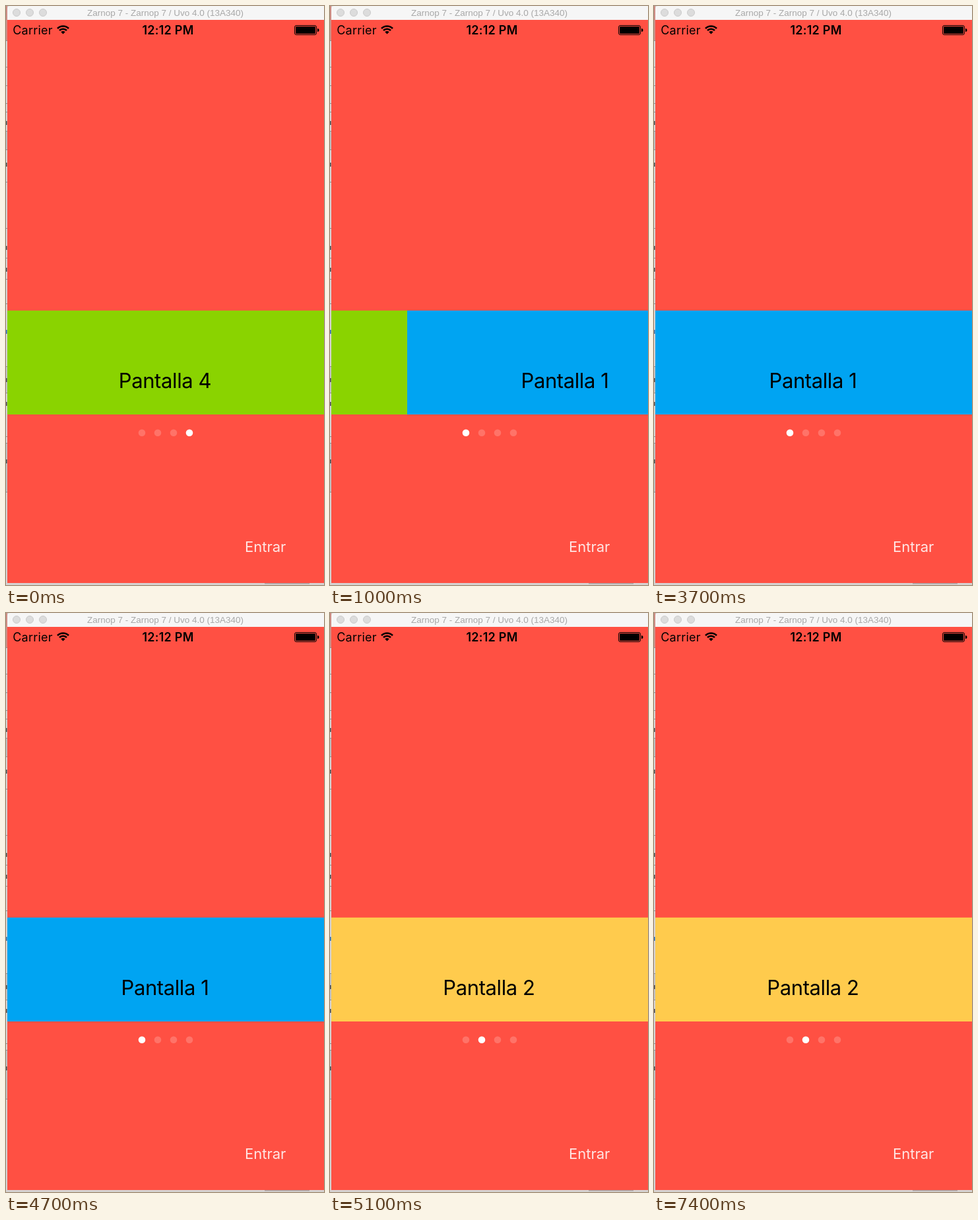
An HTML page for the animation above (7.5 s loop, 482 px wide and 876 px high).

```html
<!DOCTYPE html>
<html lang="es">
<head>
<meta charset="utf-8">
<title>Pantallas</title>
<style>
  html, body { margin: 0; width: 100%; height: 100%; overflow: hidden; background: #d6d2d1; }
  svg { display: block; }
  text { font-family: Inter, "Noto Sans", sans-serif; }
  .title { font: 13.5px "Liberation Sans", Arial, sans-serif; fill: #a8a8a8; }
  .status { font-size: 18px; letter-spacing: .25px; }
  .label { font-size: 31px; letter-spacing: -.4px; }
</style>
</head>
<body>
<svg id="stage" width="482" height="876" viewBox="0 0 482 876">
  <!-- sliver of the desktop behind the window -->
  <rect width="482" height="876" fill="#d6d2d1"/>
  <rect width="2" height="52" fill="#cf8d84"/>
  <rect y="190" width="2" height="27" fill="#bdbdbd"/>
  <rect y="545" width="2" height="40" fill="#c2c2c2"/>
  <rect y="662" width="2" height="73" fill="#c0c0c0"/>
  <g id="edge"></g>
  <rect x="392" y="873" width="68" height="1.5" fill="#aaa3a2"/>

  <!-- window -->
  <path d="M2 21V4a4 4 0 0 1 4-4H482V21z" fill="#f6f6f6"/>
  <g fill="#dcdcdc" stroke="#cbcbcb">
    <circle cx="16" cy="10" r="5.5"/><circle cx="36" cy="10" r="5.5"/><circle cx="56" cy="10" r="5.5"/>
  </g>
  <text class="title" x="241.5" y="15" text-anchor="middle">Zarnop 7 - Zarnop 7 / Uvo 4.0 (13A340)</text>
  <rect x="2" y="21" width="480" height="852" fill="#ff5043"/>

  <!-- status bar -->
  <text class="status" x="10.2" y="43">Carrier</text>
  <g fill="none" stroke="#000" stroke-width="2.6">
    <path d="M78 34a12 12 0 0 1 17 0M81 37a7.8 7.8 0 0 1 11 0"/>
    <path d="M83.3 39.3a4.5 4.5 0 0 1 6.4 0l-3.2 3.2z" fill="#000" stroke="none"/>
  </g>
  <text class="status" x="245.5" y="43" text-anchor="middle" font-weight="600">12:12 PM</text>
  <rect x="437.5" y="29.5" width="33" height="14" rx="2.5" fill="none" stroke="#000"/>
  <rect x="439" y="31" width="30" height="11" rx="1"/>
  <path d="M472 34a2.5 2.5 0 0 1 0 5z"/>

  <svg x="2" y="460.5" width="480" height="157.5"><g id="pages"></g></svg>
  <g id="dots" fill="#fff"></g>
  <text x="362" y="826" font-size="22" fill="#fff" fill-opacity=".85">Entrar</text>
  <path id="cursor" d="M426.5 660v15.5l3.6-3.4 2.5 5.6 2.6-1.1-2.4-5.5h4.6z" stroke="#fff"/>
</svg>
<script>
const LOOP = 7500, STEP = 100, WIDTH = 480;
const $ = id => document.getElementById(id);

function add(parent, tag, attrs, text = "") {
  const el = document.createElementNS("http://www.w3.org/2000/svg", tag);
  for (const key in attrs) el.setAttribute(key, attrs[key]);
  el.textContent = text;
  return parent.appendChild(el);
}

for (const y of [52, 92, 120, 147, 160, 189, 217, 266, 336, 381, 413, 450, 545, 585, 651, 661, 735])
  add($("edge"), "rect", { y, width: 2, height: 1, fill: "#8c8c8c" });
for (const y of [174, 237, 363, 396, 490, 563, 599, 686])
  add($("edge"), "rect", { y, width: 1.5, height: 6, fill: y === 490 ? "#2468a8" : "#444" });

// Pages in the order they pass: number and colour
[[4, "#8ad300"], [1, "#00a4f2"], [2, "#ffcb4d"]].forEach(([number, fill], i) => {
  const x = i * WIDTH;
  add($("pages"), "rect", { x, width: WIDTH, height: 158, fill });
  add($("pages"), "text", { x: x + 239, y: 117.5, "text-anchor": "middle", class: "label" }, "Pantalla " + number);
});

const dots = [206, 230, 254, 278].map(cx => add($("dots"), "circle", { cx, cy: 645.8, r: 5.3 }));

function slide(t, start, length) {
  const p = Math.min(1, Math.max(0, (t - start) / length));
  return p * p * (3 - 2 * p);
}

function draw() {
  // Ten pictures a second; the small lead absorbs timer jitter
  const t = Math.floor(((performance.now() + 15) % LOOP) / STEP) * STEP;
  const first = slide(t, 782, 320), second = slide(t, 4799, 305);
  const active = second > 0 ? 1 : first > 0 ? 0 : 3;
  $("pages").setAttribute("transform", `translate(${-Math.round((first + second) * WIDTH)})`);
  dots.forEach((dot, i) => dot.setAttribute("fill-opacity", i === active ? 1 : 0.2));
  $("cursor").setAttribute("visibility", t >= 1600 && t < 1900 ? "visible" : "hidden");
  requestAnimationFrame(draw);
}
draw();
</script>
</body>
</html>
```
